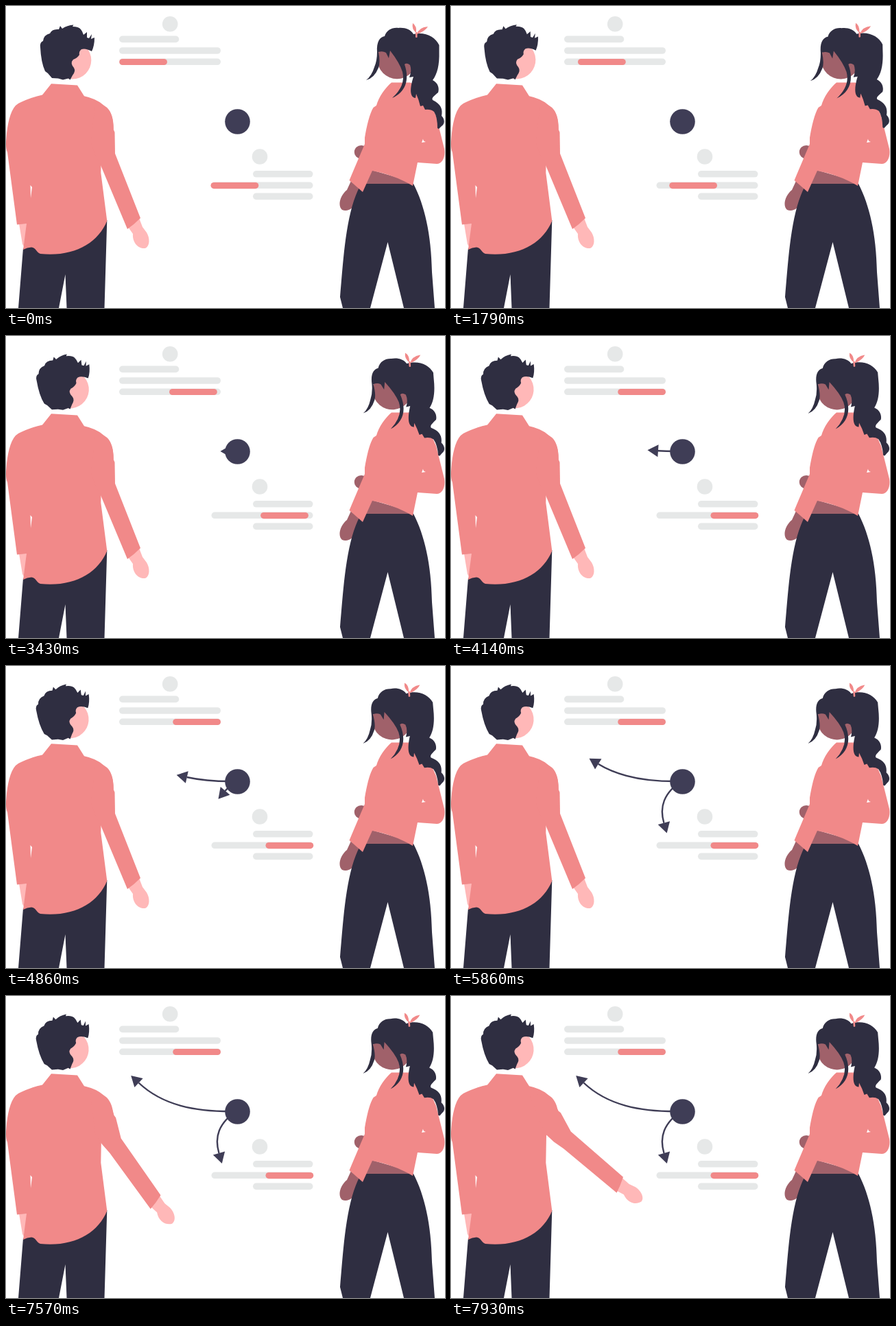
Animation of 640x440 px, one loop 8 s. Source, as an HTML page:

```html
<!DOCTYPE html>
<html lang="en">
<head>
<meta charset="utf-8">
<title>Two people, one conversation</title>
<style>
  html, body { margin: 0; width: 100%; height: 100%; overflow: hidden; background: #fff; }
  svg { display: block; width: 100vw; height: 100vh; }
  .coral { fill: #f18989; }
  .dark { fill: #2f2e41; }
  .pale { fill: #ffb8b8; }
  .brown { fill: #a0616a; }
  .grey { fill: #e6e8e8; }
  .ink { fill: #3f3d56; }
  .line { fill: none; stroke: #3f3d56; stroke-width: 2.4; }
</style>
</head>
<body>
<svg viewBox="0 0 640 440">
  <g class="grey">
    <circle cx="239.2" cy="26.2" r="11.3"/>
    <rect x="165" y="43.6" width="87.3" height="9.6" rx="4.8"/>
    <rect x="165" y="60.2" width="148" height="9.6" rx="4.8"/>
    <rect x="165" y="76.5" width="148" height="9.6" rx="4.8"/>
    <circle cx="370" cy="219.5" r="11.3"/>
    <rect x="360" y="240" width="87.5" height="9.6" rx="4.8"/>
    <rect x="299.5" y="256.5" width="148" height="9.6" rx="4.8"/>
    <rect x="360" y="272.6" width="87.5" height="9.6" rx="4.8"/>
  </g>
  <rect id="topBar" class="coral" x="165.2" y="76.9" width="69.8" height="9.2" rx="4.6"/>
  <rect id="lowBar" class="coral" x="298.5" y="257" width="69.8" height="9.2" rx="4.6"/>

  <g id="arrows"></g>
  <circle class="ink" cx="337.5" cy="168.5" r="18.3"/>

  <!-- Man -->
  <path class="pale" d="M19 317L24 347 26 350 31 316Z"/>
  <path class="dark" d="M25 353L18 440H77L86.5 391 88.5 440H143.5L147.3 312 100 335Z"/>
  <path class="coral" d="M66 113.3L104 115.5 114 131.3Q131 135 141 143.5L147 148C154 155 157 167 156.5 180L139 203 138.3 243 147.3 313C134 346 98 366 50 361C44 359 44 352 37 351.5Q31 351.5 25 355L30 317 16 318.5 2 213Q-1 207 0.5 192C2 172 6 154 14 145Q17 142 22 140Q37 133 53 129.5Z"/>
  <path fill="#fff" d="M35.5 261L38 264 36 280Z"/>
  <g id="arm">
    <path class="pale" d="M178 322L185 332C184 345 193 354 203 353C210 350 210 338 205 330L199 322 194 309Z"/>
    <path class="coral" d="M130 141L141 144.5 147 148C154 154 157 166 156.8 180L158.5 184 159 215 196 309Q187 318 177 325L138 232 130 217 124 200Z"/>
  </g>
  <g id="manHead">
    <circle class="pale" cx="96.8" cy="79" r="27.5"/>
    <path class="dark" d="M50 60Q49 53 54 51Q55 42 64 40Q67 33 77 34L79 29 82 33Q89 28 98.500 27.500L97 30Q106 30 109 34L111 37 113 42 118 38 118 46 121 47 125 41 124 48 129 46Q129 58 125 66Q116 61 110 63Q106 66 107 71Q104 76 98 78Q93 83 99 90Q102 95 97 101L93.500 107.500 91 105.500 83 107.500 76 105.500 67 105 61 98 57 95Q51 82 50 60Z"/>
  </g>

  <!-- Woman -->
  <ellipse class="brown" cx="518" cy="212.800" rx="10.200" ry="9.800"/>
  <path class="brown" d="M503 255L497 268C487 276 483 291 490 297C500 301 510 292 511 281L520 267Z"/>
  <path class="brown" d="M533 239L524 260H594L592 256Z"/>
  <path class="dark" d="M518 259H594C610 290 620 332 621 388L625 440H580L556.500 344 531 440H491L487 424C492 370 495 298 518 259Z"/>
  <path class="coral" d="M562 111.500H589C605 118 618 138 627 160L639 208C641 220 636 230 628 230L600 228 593 262Q566 246 534 240L520 271 500.500 254 523 201V192C526 174 530 157 535.500 148L540 145C543 133 553 119 562 111.500Z"/>
  <path fill="#fff" d="M608 193.500Q608 197 612 198L606 199Z"/>
  <g id="womanHead">
    <circle class="brown" cx="570" cy="77.500" r="28.700"/>
    <path class="dark" d="M541 67C540 52 545 45 552 44C555 35 563 31 572 32C581 31 590 34 594 41C611 37 626 45 631.500 57V67C632 85 629 99 622 108C630 112 632 120 630 126C624 131 620 134 622 137C634 143 637 150 635 160C640 165 640 172 635 175L631 179 629 178Q629 162 624 154Q619 150 611 151L608 145 604 146Q602 137 598 128L597 134C589 133 588 122 594 103L588 104Q592 94 589 86Q584 82 581 85C589 108 582 126 563 134Q583 116 578 96Q574 83 560 65L558 76 554 68Q549 65 543 67Q546 82 543 90Q537 105 525 108Q533 102 537 89Q541 80 541 67Z"/>
    <g class="coral">
      <path d="M598 39Q591 34 593 25Q599 29 598 39Z"/>
      <path d="M599 41Q602 31 615 30Q611 37 599 41Z"/>
      <rect x="597" y="38" width="2.600" height="8" rx="1"/>
    </g>
  </g>
</svg>
<script>
  const LOOP = 8000;
  const byId = id => document.getElementById(id);

  const linear = u => u;
  const smooth = u => (1 - Math.cos(Math.PI * u)) / 2;
  const progress = (t, from, to, ease = linear) =>
    ease(Math.min(1, Math.max(0, (t - from) / (to - from))));

  function addNode(tag, attrs) {
    const node = document.createElementNS('http://www.w3.org/2000/svg', tag);
    for (const key in attrs) node.setAttribute(key, attrs[key]);
    return byId('arrows').appendChild(node);
  }

  // A line that grows along its path, led by a head following the tangent.
  function makeArrow(d, from, to) {
    const line = addNode('path', { d, class: 'line' });
    const head = addNode('path', { d: 'M15.5 0L0 9V-9Z', class: 'ink' });
    const length = line.getTotalLength();
    return t => {
      const s = length * progress(t, from, to, smooth);
      const base = line.getPointAtLength(s);
      const a = line.getPointAtLength(Math.max(0, s - 1));
      const b = line.getPointAtLength(Math.min(length, s + 1));
      const angle = Math.atan2(b.y - a.y, b.x - a.x) * 180 / Math.PI;
      line.setAttribute('stroke-dasharray', `${s} ${length + 10}`);
      head.setAttribute('transform', `translate(${base.x} ${base.y}) rotate(${angle})`);
    };
  }

  const slide = (id, distance, from, to) => t =>
    byId(id).setAttribute('transform', `translate(${distance * progress(t, from, to)} 0)`);

  const turn = (id, degrees, x, y, from, to) => t =>
    byId(id).setAttribute('transform', `rotate(${degrees * progress(t, from, to)} ${x} ${y})`);

  const parts = [
    slide('topBar', 78, 1180, 3590),
    slide('lowBar', 80, 1180, 3660),
    turn('manHead', -7.5, 86, 107, 1180, 3620),
    turn('womanHead', -5, 580, 162, 1180, 3620),
    makeArrow('M335 168C275 169 228 159 193.5 126.5', 2855, 7010),
    makeArrow('M340 165C308 185 304 207 310.5 229', 4140, 5940),
    turn('arm', -27.5, 131, 174, 7230, 7930)
  ];

  const start = performance.now();
  function draw() {
    const t = (performance.now() - start) % LOOP;
    parts.forEach(update => update(t));
    requestAnimationFrame(draw);
  }
  draw();
</script>
</body>
</html>
```
